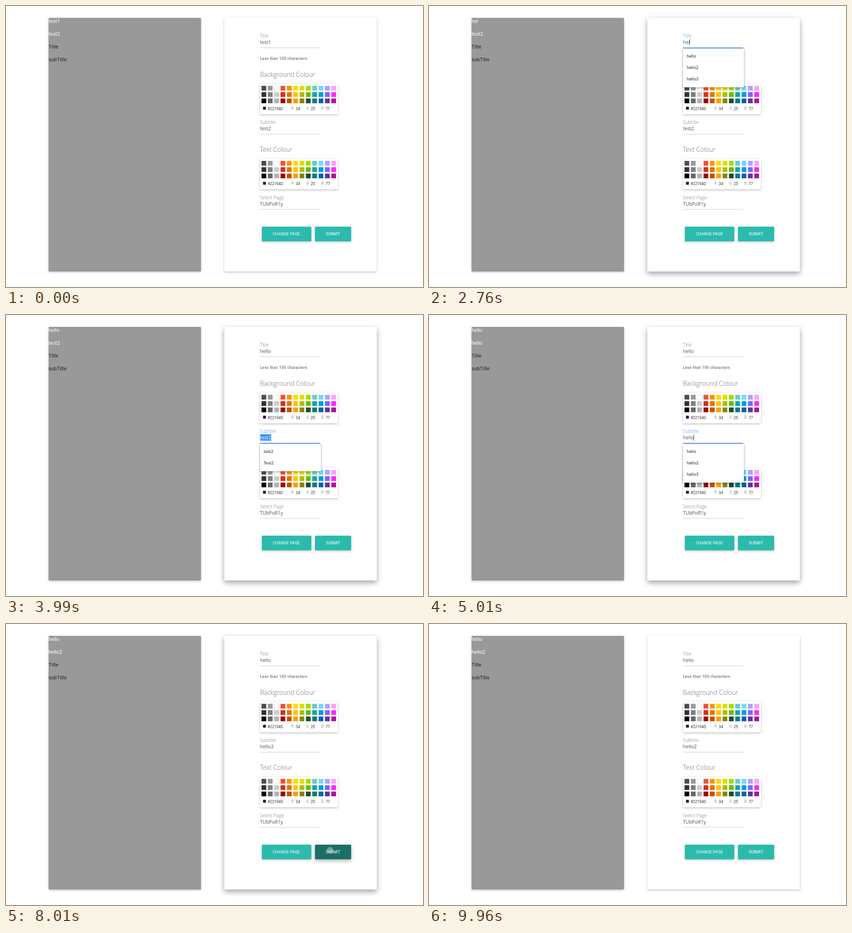
Write an HTML page that moves like this. It is 911 px wide and 615 px high and loops after 9990 ms.

```html
<!DOCTYPE html>
<html lang="en">
<head>
<meta charset="utf-8">
<title>Page form</title>
<style>
  html, body { margin: 0; width: 100%; height: 100%; overflow: hidden; background: #fff; }
  #stage { position: relative; width: 911px; height: 615px; overflow: hidden; }
  #stage div, #stage svg { position: absolute; }
  svg { left: 0; top: 0; overflow: hidden; }
  text { white-space: pre; }
  .preview { font: 11px Roboto, sans-serif; }
  .label { font: 300 10.2px "Open Sans", sans-serif; fill: #757575; }
  .input { font: 10.5px "Open Sans", sans-serif; fill: #495057; }
  .head { font: 300 14px "Open Sans", sans-serif; fill: #6c6c6c; }
  .help { font: 500 8.6px Roboto, sans-serif; letter-spacing: .25px; fill: #757575; }
  .small { font: 8.3px Roboto, sans-serif; fill: #333; }
  .dim { fill: #999; }
  .btn { font: 8.87px Roboto, sans-serif; fill: #fff; }
  .item { font: 9px "Open Sans", sans-serif; fill: #111; }
</style>
</head>
<body>
<div id="stage"></div>
<script>
const LOOP = 9990;
const stage = document.getElementById('stage');
const LEFT = 554.7;

// Shadow layers: y, blur, alpha, y, blur, alpha
const FLAT = [1.4, 3.5, .16, 1.4, 7, .12];
const CARD_UP = [5.5, 11.8, .2, 4.2, 13.9, .19];
const BTN_UP = [3.5, 7.6, .18, 2.8, 10.4, .15];
const GREY = [117, 117, 117], LINE = [204, 204, 204], BLUE = [66, 133, 244];
const TEAL = [43, 187, 173], DARK = [26, 111, 103];

const PALETTE = [
  '4d4d4d 999999 ffffff f44e3b fe9200 fcdc00 dbdf00 a4dd00 68ccca 73d8ff aea1ff fda1ff',
  '333333 808080 cccccc d33115 e27300 fcc400 b0bc00 68bc00 16a5a5 009ce0 7b64ff fa28ff',
  '000000 666666 b3b3b3 9f0500 c45100 fb9e00 808900 194d33 0c797d 0062b1 653294 ab149e'
].map(row => row.split(' '));

const mix = (a, b, k) => a.map((v, i) => v + (b[i] - v) * k);
const rgb = c => `rgb(${c.map(Math.round)})`;
const ramp = (t, from, span) => Math.min(1, Math.max(0, (t - from) / span));
const within = (t, spans) => spans.some(([a, b]) => t >= a && t < b);
const at = (steps, t) => steps.reduce((cur, s) => (t >= s[0] ? s : cur));
const shadow = (a, b = a, k = 0) => {
  const s = mix(a, b, k);
  return `0 ${s[0]}px ${s[1]}px rgba(0,0,0,${s[2]}), 0 ${s[3]}px ${s[4]}px rgba(0,0,0,${s[5]})`;
};

function box(x, y, w, h, fill, radius) {
  const el = document.createElement('div');
  Object.assign(el.style, {
    left: x + 'px', top: y + 'px', width: w + 'px', height: h + 'px',
    background: fill, borderRadius: radius + 'px', boxShadow: shadow(FLAT)
  });
  stage.append(el);
  return el;
}

function node(parent, tag, attrs) {
  const el = document.createElementNS('http://www.w3.org/2000/svg', tag);
  set(el, attrs);
  parent.append(el);
  return el;
}
function set(el, attrs) {
  for (const key in attrs) el.setAttribute(key, attrs[key]);
}
const layer = () => node(stage, 'svg', { width: 911, height: 615 });
const rect = (p, x, y, width, height, fill) => node(p, 'rect', { x, y, width, height, fill });
function text(p, x, y, str, cls, fill) {
  const el = node(p, 'text', { x, y, class: cls });
  if (fill) el.style.fill = fill;
  el.textContent = str;
  return el;
}

// Boxes with shadows
box(93, 25.5, 332.5, 555, '#999', 2);
const card = box(477, 25.5, 333, 555, '#fff', 2);
const PANELS = [0, 164.3];
PANELS.forEach(dy => box(LEFT, 170.3 + dy, 169.9, 66.7, '#fff', 1.4));
box(559, 483, 107.5, 31.5, rgb(TEAL), 1.4);
const submit = box(674.7, 483, 79.8, 31.5, rgb(TEAL), 1.4);

// Fixed and editable content
const art = layer();
const preview = [['', '#fff'], ['', '#fff'], ['Title', '#212529'], ['subTitle', '#212529']]
  .map(([s, fill], i) => text(art, 93, 37.3 + i * 27.75, s, 'preview', fill));

function field(name, dy) {
  const line = rect(art, 555, 91 + dy, 131.7, 1, rgb(LINE));
  const mark = rect(art, 555, 72 + dy, 0, 14, '#3390ff');
  const caret = rect(art, 0, 72 + dy, 1, 14, '#495057');
  const label = text(art, LEFT, 69.4 + dy, name, 'label');
  const input = text(art, LEFT, 83.1 + dy, '', 'input');
  caret.style.display = 'none';
  return { line, mark, caret, label, input };
}
const fields = [field('Title', 0), field('Subtitle', 189)];
field('Select Page', 353.6).input.textContent = 'TUbPoR1y';

text(art, LEFT, 118, 'Less than 100 characters', 'help');
text(art, LEFT, 154.6, 'Background Colour', 'head');
text(art, LEFT, 319, 'Text Colour', 'head');

PANELS.forEach(dy => {
  PALETTE.forEach((row, r) => row.forEach((hex, c) => {
    const x = 558.2 + c * 13.86, y = 174.7 + dy + r * 13.86;
    rect(art, x, y, 10.4, 10.4, '#' + hex);
    if (hex === 'ffffff')
      set(rect(art, x + .35, y + .35, 9.7, 9.7, 'none'), { stroke: '#ddd', 'stroke-width': .7 });
  }));
  rect(art, 561.5, 220.5 + dy, 6.3, 6.3, '#22194d');
  text(art, 571.5, 228 + dy, '#22194D', 'small');
  [['R', '34'], ['G', '25'], ['B', '77']].forEach(([key, val], i) => {
    text(art, 623.3 + i * 32.7, 227 + dy, key, 'small dim');
    text(art, 633 + i * 32.7, 228 + dy, val, 'small');
  });
});

const clip = node(art, 'clipPath', { id: 'press' });
set(rect(clip, 674.7, 483, 79.8, 31.5, '#000'), { rx: 1.4 });
const ripple = node(art, 'circle', { cx: 708, cy: 495, r: 0, fill: '#fff', 'clip-path': 'url(#press)' });
text(art, 582.8, 502, 'CHANGE PAGE', 'btn');
text(art, 698.5, 502, 'SUBMIT', 'btn');

// Suggestion list
const menu = box(LEFT, 93, 133.3, 85, '#fff', 1.5);
menu.style.boxShadow = '0 1px 4px rgba(0,0,0,.45)';
const list = layer();
const rows = Array.from({ length: 6 }, () => text(list, 563, 0, '', 'item'));

const HELLO = ['hello', 'hello2', 'hello3'];
const HE = [...HELLO, 'hey', 'header', 'heading'];
const MENUS = [
  [0, 93, []],
  [1440, 93, ['test1', 'Test1', 'test12']],
  [2370, 93, HE],
  [2760, 93, HELLO],
  [3720, 282, ['test2', 'Test2']],
  [4500, 282, HE],
  [4830, 282, HELLO],
  [5520, 282, []]
];
const TYPED = [
  [[0, 'test1'], [2370, 'h'], [2430, 'he'], [2760, 'hel'], [2880, 'hell'], [2940, 'hello']],
  [[0, 'test2'], [4500, 'h'], [4560, 'he'], [4830, 'hel'], [4920, 'hell'], [5010, 'hello'], [5490, 'hello2']]
];
const FOCUS = [[1440, 150, 3720], [3720, 200, 6450]];
const SELECTED = [[[1890, 2370]], [[3960, 4500]]];
const CARET = [[[1440, 1890], [2370, 3300]], [[3720, 3960], [4500, 6000]]];

function drawField(f, i, t) {
  const str = at(TYPED[i], t)[1];
  if (f.input.textContent !== str) f.input.textContent = preview[i].textContent = str;

  const [start, span, end] = FOCUS[i];
  const k = ramp(t, start, span) - ramp(t, end, 180);
  f.label.style.fill = rgb(mix(GREY, BLUE, k));
  set(f.line, { fill: rgb(mix(LINE, BLUE, k)), height: 1 + k * .6 });

  const width = f.input.getComputedTextLength();
  const selected = within(t, SELECTED[i]);
  set(f.mark, { width: selected ? width : 0 });
  f.input.style.fill = selected ? '#fff' : '';
  f.caret.style.display = within(t, CARET[i]) ? '' : 'none';
  set(f.caret, { x: Math.floor(LEFT + width) });
}

function drawMenu(t) {
  const [, top, items] = at(MENUS, t);
  menu.style.display = items.length ? '' : 'none';
  menu.style.top = top + 'px';
  menu.style.height = items.length * 25 + 10 + 'px';
  rows.forEach((row, i) => {
    row.textContent = items[i] || '';
    set(row, { y: top + 20.4 + i * 25 });
  });
}

function drawSubmit(t) {
  const hover = ramp(t, 6870, 180) - ramp(t, 9900, 60);
  const dark = ramp(t, 7620, 210) - ramp(t, 8100, 200);
  submit.style.boxShadow = shadow(FLAT, BTN_UP, hover);
  submit.style.background = rgb(mix(TEAL, DARK, dark));
  const p = ramp(t, 7980, 700);
  set(ripple, { r: 80 * (1 - (1 - p) ** 2), opacity: .35 * (1 - ramp(t, 8200, 230)) });
}

function draw(t) {
  const dip = ramp(t, 2880, 120) - ramp(t, 3030, 120);
  card.style.boxShadow = shadow(FLAT, CARD_UP, t >= 480 && t < 9030 ? 1 - dip : 0);
  fields.forEach((f, i) => drawField(f, i, t));
  drawMenu(t);
  drawSubmit(t);
}

const begin = performance.now();
function tick() {
  draw((performance.now() - begin) % LOOP);
  requestAnimationFrame(tick);
}
tick();
</script>
</body>
</html>
```
